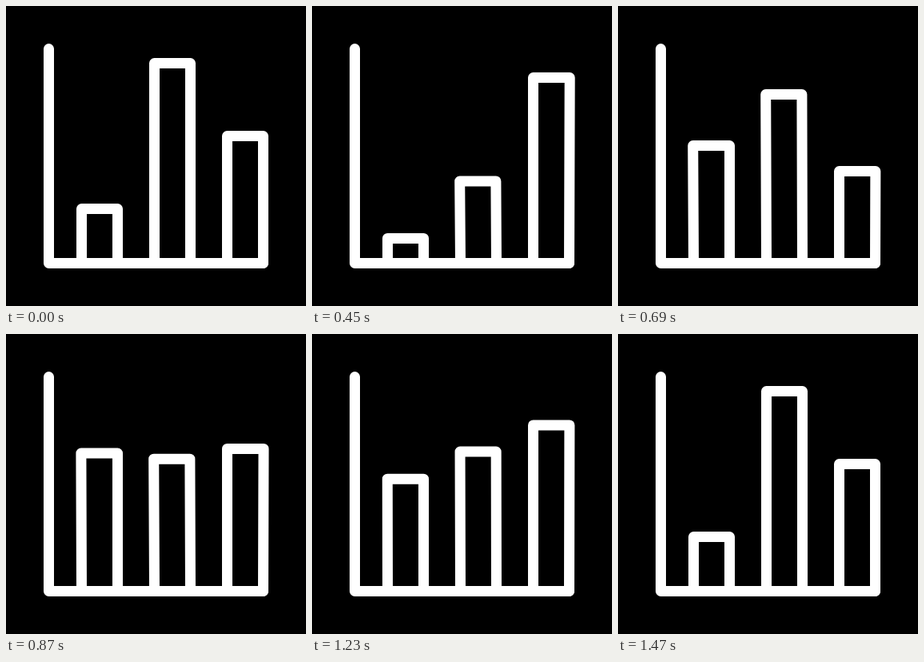
Write an HTML page that moves like this. It is 375 by 375 pixels and loops after 1800 ms.

```html
<!DOCTYPE html>
<html lang="en">
<head>
<meta charset="utf-8">
<title>Bar chart</title>
<style>
  html, body { margin: 0; width: 100%; height: 100%; overflow: hidden; background: #000; }
  svg { display: block; width: 100%; height: 100%; }
  path { fill: none; stroke: #fff; stroke-width: 13; stroke-linecap: round; stroke-linejoin: round; }
</style>
</head>
<body>
<svg viewBox="0 0 375 375">
  <path d="M53.5 53.5V321.5H321.5"/>
  <path class="bar"/>
  <path class="bar"/>
  <path class="bar"/>
</svg>
<script>
  const LOOP = 1800, STEP = 30, BASE = 321.5;
  const times = [0, 441, 713, 1029, 1470];

  // Per bar: side positions, top edge at each key time, sideways drift of the top corners
  const bars = [
    { x: [94.5, 139.5], top: [253.5, 290.8, 172.1, 125.7, 253.5], lean: [0, 0, 1, 0.5, 0], drift: [-0.8, 0] },
    { x: [185.5, 230.5], top: [71.5, 219.3, 108.3, 205, 71.5], lean: [0, 1, 1, 1, 0], drift: [-0.8, -0.6] },
    { x: [276.5, 321.5], top: [162.5, 89.2, 208.9, 76.7, 162.5], lean: [0, 1, 0.5, 1, 0], drift: [0, 0.7] }
  ];
  const paths = document.querySelectorAll('.bar');

  const ease = u => u * u * (3 - 2 * u);
  const mix = (a, b, p) => a + (b - a) * p;

  function draw(t) {
    t = Math.min(t, times[4]);
    const i = Math.min(times.findLastIndex(k => k <= t), 3);
    const p = ease((t - times[i]) / (times[i + 1] - times[i]));
    bars.forEach(({ x, top, lean, drift }, n) => {
      const y = mix(top[i], top[i + 1], p);
      const k = mix(lean[i], lean[i + 1], p);
      const [l, r] = x;
      paths[n].setAttribute('d',
        `M${l} ${BASE}L${l + drift[0] * k} ${y}L${r + drift[1] * k} ${y}L${r} ${BASE}`);
    });
  }

  const start = performance.now();
  function tick() {
    const t = (performance.now() - start + 1) % LOOP;
    draw(Math.floor(t / STEP) * STEP);
    requestAnimationFrame(tick);
  }
  tick();
</script>
</body>
</html>
```
